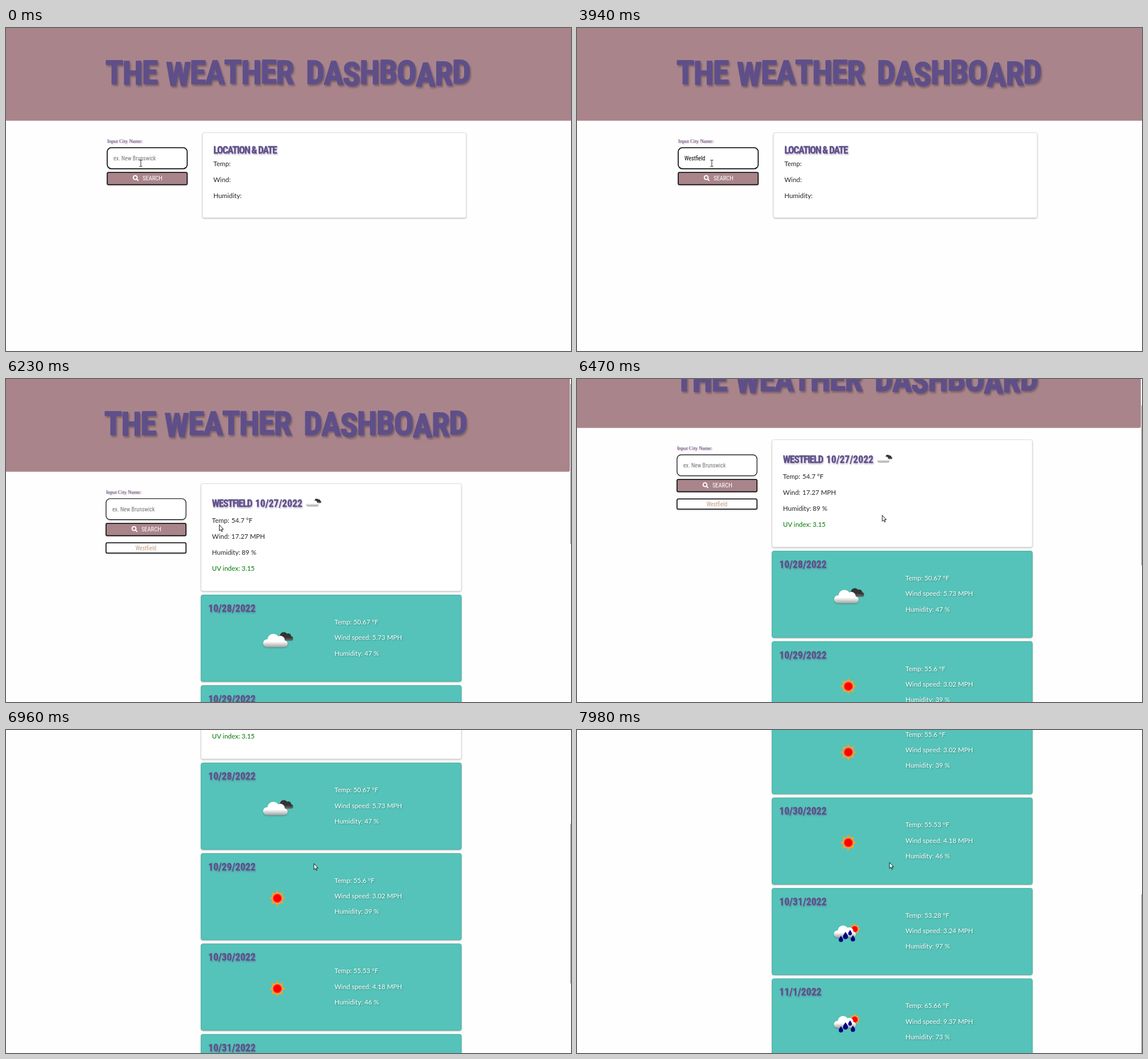
Write an HTML page that moves like this. It is 989 px wide and 566 px high and loops after 8000 ms.

```html
<!DOCTYPE html>
<html lang="en">
<head>
<meta charset="utf-8">
<title>The Weather Dashboard</title>
<style>
html, body { margin: 0; height: 100%; overflow: hidden; background: #fefefe; }
svg { display: block; }
text { white-space: pre; }
.title, .head, .date { font-family: "Roboto Condensed", Roboto, sans-serif; font-stretch: 75%; font-weight: 900; fill: #5f4f89; stroke: #5f4f89; stroke-linejoin: round; }
.title { font-size: 58px; letter-spacing: -1.6px; stroke-width: 1.6; filter: drop-shadow(2px 3px 1.5px #0004); }
.head, .date { font-size: 17.6px; stroke-width: .3; filter: drop-shadow(1px 2px 1px #5f4f8966); }
.head { letter-spacing: -1.25px; }
.hand { font: 10px "Roboto Condensed", Roboto, sans-serif; font-stretch: 75%; }
.label { font: 8.9px "Liberation Serif", serif; fill: #5f4f89; filter: drop-shadow(1px 1px 1px #a9838b); }
.body { font: 11.5px Lato, sans-serif; fill: #212529; }
.day .body { fill: #fff; filter: drop-shadow(1px 1.5px 1px #0005); }
.box { filter: drop-shadow(0 1.5px 1px #0004); }
.edge { stroke: #000; stroke-width: 1.5; }
</style>
</head>
<body>
<svg id="stage" width="989" height="566"></svg>
<script>
const stage = document.getElementById('stage');
const $ = id => document.getElementById(id);
const rect = (x, y, w, h, r, more) => `<rect x="${x}" y="${y}" width="${w}" height="${h}" rx="${r}" ${more}/>`;
const text = (cls, x, y, s, more = '') => `<text class="${cls}" x="${x}" y="${y}" ${more}>${s}</text>`;
const circles = list => list.map(([x, y, r]) => `<circle cx="${x}" cy="${y}" r="${r}"/>`).join('');
const use = (id, x, y, k = 1) => `<use href="#${id}" transform="translate(${x} ${y}) scale(${k})"/>`;
const gradient = (id, a, b) => `<linearGradient id="${id}" gradientUnits="userSpaceOnUse" x1="0" x2="0" y1="2" y2="13">
  <stop stop-color="${a}"/><stop offset="1" stop-color="${b}"/></linearGradient>`;
const drop = (x, y, k) => `<path transform="translate(${x} ${y}) scale(${k})" fill="#000080" d="M0-6C1-3 4-1 4 2A4 4 0 0 1-4 2C-4-1-1-3 0-6Z"/>`;

const rays = Array.from({ length: 8 }, (_, i) =>
  `<path transform="rotate(${i * 45})" d="M-3-8L0-15 3-8Z" fill="#f9a01b"/>`).join('');
const defs = `<defs>
  ${gradient('white', '#fff', '#999')}${gradient('dark', '#333', '#777')}
  <radialGradient id="glow"><stop offset=".6" stop-color="#f00"/><stop offset=".85" stop-color="#f63"/><stop offset="1" stop-color="#fc7"/></radialGradient>
  <g id="puff">${circles([[-19, 5, 7], [-8, -1, 10.5], [4, 0, 8], [11, 6, 6]])}${rect(-19, 2, 30, 10, 0, '')}</g>
  <g id="clouds"><g fill="url(#dark)">${use('puff', 15.5, -6, 0.65)}</g>
    <g fill="url(#white)" class="box">${use('puff', 0, 1)}</g></g>
  <g id="sun">${rays}<circle r="9.5" fill="url(#glow)"/></g>
  <g id="rain">${use('sun', 11, -7, 0.72)}<g fill="url(#white)" class="box">${use('puff', -2, -3, 0.9)}</g>
    ${drop(-13, 10, 0.95)}${drop(-5, 4, 1.1)}${drop(3, -1, 0.8)}${drop(8, 9, 0.95)}</g>
</defs>`;

// Title letters sit on an uneven baseline.
const word = (s, x, ys) => text('title', x, ys.join(' '), s);
const title = `<g id="title">
  ${word('THE', 174, [98, 99, 98])}
  ${word('WEATHER', 280, [101, 98, 98, 97, 98, 97, 98])}
  ${word('DASHBOARD', 525, [98, 99, 101, 98, 97, 98, 102, 100, 97])}</g>`;

const form = `<g id="form">
  ${text('label', 177, 201, 'Input City Name:')}
  <g class="box">${rect(177.3, 209.8, 139.8, 36.6, 7, 'id="input" fill="#fff" stroke="#000"')}</g>
  ${text('hand', 188, 231.5, 'ex. New Brunswick', 'id="hint" fill="#757575"')}
  ${text('hand', 188, 231.5, '', 'id="typed"')}
  ${rect(0, 221, 1, 14, 0, 'id="caret"')}
  <g class="box">${rect(177.3, 252.9, 139.8, 21.6, 2, 'id="button" class="edge"')}</g>
  <g fill="none" stroke="#fff" stroke-width="1.9" stroke-linecap="round"><circle cx="226.2" cy="262.2" r="3.4"/><path d="M229 265l2.3 2.3"/></g>
  ${text('hand', 239, 267, 'SEARCH', 'fill="#fff" style="font-size:10.5px"')}
  <g id="city"><g class="box">${rect(177.3, 287.1, 139.8, 17.8, 2, 'class="edge" fill="#fff"')}</g>
  ${text('hand', 247, 299.5, 'Westfield', 'fill="#c49a7c" text-anchor="middle"')}</g></g>`;

const rows = (x, y, gap, list) => list.map((s, i) => text('body', x, y + i * gap, s)).join('');
const now = `<g class="box">${rect(344, 183.5, 461.5, 149, 3, 'id="card" fill="#fff" stroke="#dfdfdf"')}</g>
  <g id="empty">${text('head', 363, 219.5, 'LOCATION &amp; DATE')}${rows(363, 242, 28, ['Temp:', 'Wind:', 'Humidity:'])}</g>
  <g id="filled">${text('head', 363, 223.5, 'WESTFIELD')}${text('date', 438.5, 223.5, '10/27/2022')}
    ${use('clouds', 541, 216.5, 0.5)}
    ${rows(363, 252, 28, ['Temp:', 'Wind:', 'Humidity:'])}
    ${rows(397, 252, 28, ['54.7 °F', '17.27 MPH'])}${text('body', 415, 308, '89 %')}
    ${text('body', 363, 336, 'UV index: 3.15', 'id="uv" style="fill:#007800"')}</g>`;

const days = [
  ['10/28/2022', 'clouds', 50.67, 5.73, 47],
  ['10/29/2022', 'sun', 55.6, 3.02, 39],
  ['10/30/2022', 'sun', 55.53, 4.18, 46],
  ['10/31/2022', 'rain', 53.28, 3.24, 97],
  ['11/1/2022', 'rain', 65.66, 9.37, 73]
].map(([date, icon, temp, wind, hum], i) => `<g class="day" transform="translate(0 ${378 + i * 158.5})">
  <g class="box">${rect(341.5, 0.5, 455.5, 151.5, 3, 'fill="#55c3b9" stroke="#47aea5"')}</g>
  ${text('date', 354, 30, date)}${use(icon, icon == 'clouds' ? 476 : 475, 79)}
  ${rows(575, 52, 27.3, [`Temp: ${temp} ºF`, `Wind speed: ${wind} MPH`, `Humidity: ${hum} %`])}</g>`).join('');

const cursors = `<g id="mouse" stroke-linejoin="round">
  <path id="beam" fill="none" stroke="#222" d="M-2.5-5.5H-.5L0-5 .5-5.5H2.5M0-5V5M-2.5 5.5H-.5L0 5 .5 5.5H2.5"/>
  <path id="finger" fill="#fff" stroke="#000" d="M-1.4 9V1.2a1.3 1.3 0 0 1 2.6 0V5.4l1.2-.3 1 .7 1.3-.2 1 .8 1.4.2.6 1v3.4l-1.2 2V15h-6l-.4-1.6-4-5 .8-1z"/>
  <path id="arrow" fill="#fff" stroke="#000" stroke-width=".9" d="M0 0V10.5L2.4 8.4 4 12 5.6 11.3 4 7.8H7.2Z"/></g>`;

stage.innerHTML = `${defs}<g id="page">${rect(-9, -9, 998, 171.6, 3, 'id="banner" fill="#a9858b"')}${title}${form}${now}
  <g id="days">${days}</g></g>${rect(988, 0, 1, 280, 0, 'id="thumb" fill="#8b8b8b"')}${cursors}`;

// Linear track through [time, ...values] points.
function track(points, t) {
  const i = points.findIndex(p => p[0] > t);
  if (i < 0) return points.at(-1).slice(1);
  if (i == 0) return points[0].slice(1);
  const a = points[i - 1], b = points[i], k = (t - a[0]) / (b[0] - a[0]);
  return a.slice(1).map((v, j) => v + (b[j + 1] - v) * k);
}
const scrollPath = [[6340, 0], [6470, 76], [6600, 200], [6700, 278], [6780, 312], [6950, 312], [6960, 319.5],
  [7050, 430], [7130, 522], [7210, 572], [7280, 572], [7400, 576], [7810, 576], [7980, 576.6]];
const mousePath = [[4220, 236, 237], [4520, 242, 269], [6060, 242, 269], [6440, 534, 239], [6780, 537, 236],
  [6940, 537, 236], [6960, 539, 234], [7210, 543, 234], [7630, 545, 233], [7810, 545, 233], [7980, 547, 232]];
const keys = [1150, 1390, 1600, 2130, 2370, 3000, 3110, 3290, 3410];
const CLICK = 4570, LOADED = 5160, FORECAST = 5410;

const show = (id, on) => $(id).style.display = on ? '' : 'none';
const set = (id, attrs) => { for (const k in attrs) $(id).setAttribute(k, attrs[k]); };

function draw(t) {
  const count = t < CLICK ? keys.filter(k => k <= t).length : 0;
  const focus = t < 4520, loaded = t >= LOADED, wide = t < FORECAST;
  const [scroll] = track(scrollPath, t), [x, y] = track(mousePath, t);

  $('typed').textContent = 'Westfield'.slice(0, count);
  show('hint', !count);
  set('caret', { x: 188 + (count ? $('typed').getComputedTextLength() : 0) });
  show('caret', focus && (count ? t - keys[count - 1] < 530 : t >= 400 && t < 900));
  set('input', { 'stroke-width': focus ? 1.5 : 1.1 });

  const over = x < 318 && y < 276;
  const pointer = over && y < 247 ? 'beam' : over && y > 252 ? 'finger' : 'arrow';
  for (const id of ['beam', 'finger', 'arrow']) show(id, id == pointer);
  set('mouse', { transform: `translate(${x} ${y})` });
  set('button', { fill: pointer == 'finger' ? '#5f4f89' : '#a9858b' });

  show('empty', t < CLICK);
  for (const id of ['filled', 'city']) show(id, loaded);
  for (const id of ['uv', 'days', 'thumb']) show(id, !wide);

  // The scrollbar narrows the page.
  set('banner', { width: wide ? 1010 : 996 });
  set('title', { transform: wide ? '' : 'translate(-.9 .5) scale(.994)' });
  set('form', { transform: `translate(${wide ? 0 : -2.1} 0)` });
  set('filled', { transform: `translate(${wide ? 0 : -2.4} 0)` });
  set('card', { x: wide ? 344 : 341.5, width: wide ? 461.5 : 455.5, height: !loaded ? 149 : wide ? 159.5 : 188 });
  set('page', { transform: `translate(0 ${-scroll})` });
  set('thumb', { y: 9 + scroll * 0.484 });
}

function tick(time) {
  draw(time % 8000);
  requestAnimationFrame(tick);
}
requestAnimationFrame(tick);
</script>
</body>
</html>
```
